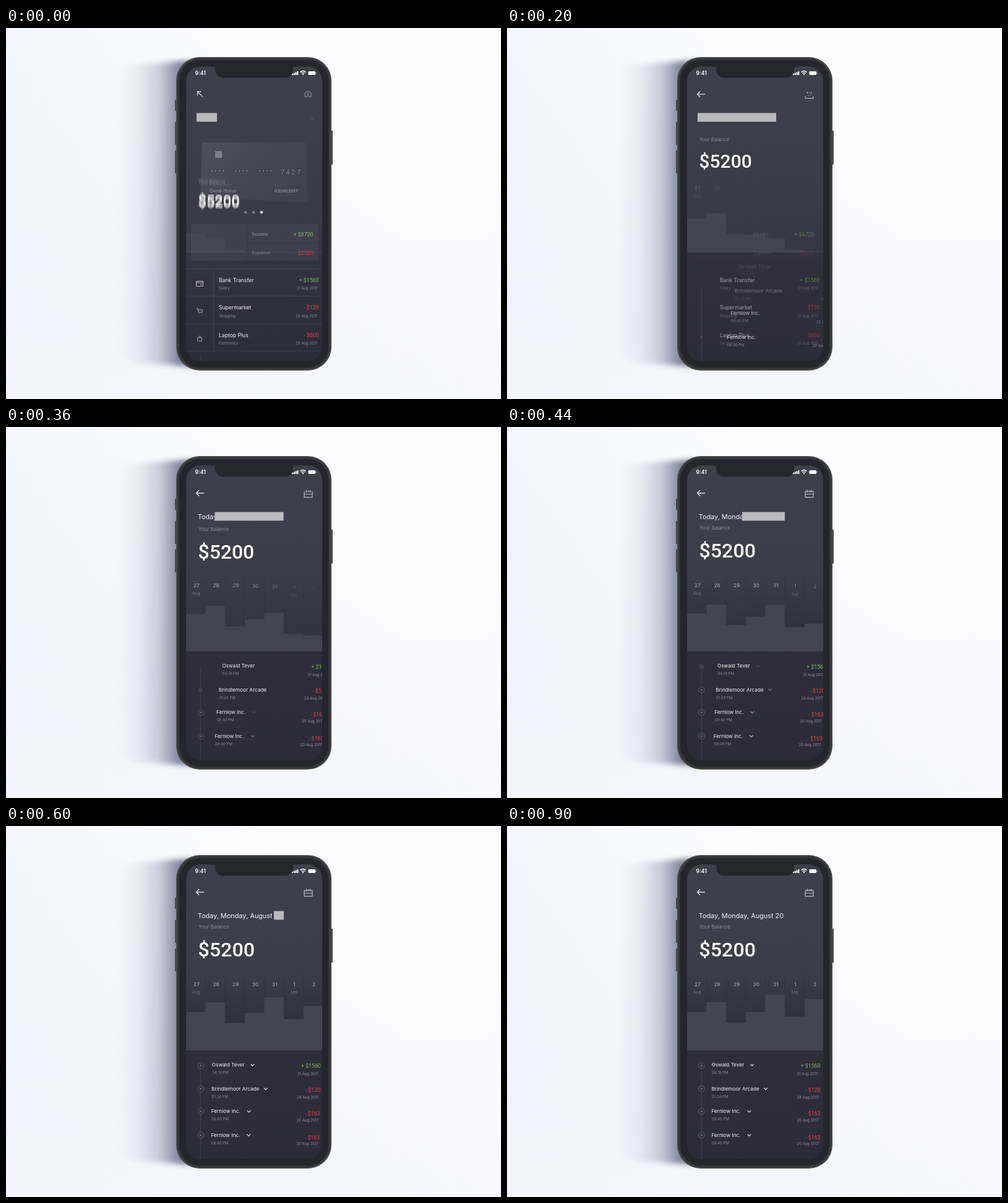
Write an HTML page with a canvas that moves like this. It is 800x600 px and loops after 1.04 s.

```html
<!DOCTYPE html>
<html lang="en">
<head>
<meta charset="utf-8">
<title>Balance screen</title>
<style>
html, body { margin: 0; width: 100%; height: 100%; overflow: hidden; background: #fff; }
canvas { display: block; }
</style>
</head>
<body>
<canvas id="stage" width="800" height="600"></canvas>
<script>
const LOOP = 1040, STEP = 20;
const stage = document.getElementById('stage');
const back = document.createElement('canvas');
back.width = 800;
back.height = 600;
let g = back.getContext('2d');

const SANS = 'Inter, sans-serif', DIN = 'Roboto, sans-serif';
const GREEN = '#84bd56', RED = '#e2474f', GREY = '#8a8a95', WHITE = '#f4f4f7';
const clamp = v => Math.max(0, Math.min(1, v));

// Smooth monotone curve through time, value pairs
function track(t, ...k) {
  const n = k.length / 2, T = i => k[2 * i], V = i => k[2 * i + 1];
  if (t <= T(0)) return V(0);
  if (t >= T(n - 1)) return V(n - 1);
  let i = 0;
  while (t > T(i + 1)) i++;
  const slope = j => (V(j + 1) - V(j)) / (T(j + 1) - T(j));
  const tangent = j => {
    if (j === 0) return slope(0);
    if (j === n - 1) return 0;
    const a = slope(j - 1), b = slope(j);
    return a * b > 0 ? 2 * a * b / (a + b) : 0;
  };
  const h = T(i + 1) - T(i), u = (t - T(i)) / h, w = 1 - u;
  return V(i) * (1 + 2 * u) * w * w + V(i + 1) * u * u * (3 - 2 * u)
    + h * u * w * (tangent(i) * w - tangent(i + 1) * u);
}

function gradient(x0, y0, x1, y1, ...colors) {
  const f = g.createLinearGradient(x0, y0, x1, y1);
  colors.forEach((c, i) => f.addColorStop(i / (colors.length - 1), c));
  return f;
}

function rect(x, y, w, h, fill, alpha = 1) {
  g.globalAlpha = alpha;
  g.fillStyle = fill;
  g.fillRect(x, y, w, h);
}

function round(x, y, w, h, r, fill) {
  g.globalAlpha = 1;
  g.beginPath();
  g.roundRect(x, y, w, h, r);
  g.fillStyle = fill;
  g.fill();
}

function disc(x, y, r, fill, alpha = 1) {
  g.globalAlpha = alpha;
  g.beginPath();
  g.arc(x, y, r, 0, 7);
  g.fillStyle = fill;
  g.fill();
}

function stroke(path, color, width = 1, alpha = 1) {
  g.globalAlpha = alpha;
  g.strokeStyle = color;
  g.lineWidth = width;
  g.stroke(new Path2D(path));
}

function text(s, x, y, size, color, alpha = 1, font = SANS, weight = 400, align = 'left') {
  if (alpha <= 0) return;
  g.globalAlpha = clamp(alpha);
  g.font = `${weight} ${size}px ${font}`;
  g.textAlign = align;
  g.fillStyle = color;
  g.fillText(s, x, y);
}

const amount = (s, x, y, alpha) =>
  text(s, x, y, 8.8, s[0] === '+' ? GREEN : RED, alpha, DIN, 400, 'right');

function at(x, y, scale, angle, draw) {
  g.save();
  g.translate(x, y);
  g.rotate(angle);
  g.scale(scale, scale);
  draw();
  g.restore();
}

// Vertically smeared text
function smear(s, x, y, size, color, alpha, spread, font, weight) {
  if (spread < 0.2) return text(s, x, y, size, color, alpha, font, weight);
  for (let j = -2; j <= 2; j++) text(s, x, y + j * spread / 2, size, color, alpha * 0.42, font, weight);
}

function drawBackdrop() {
  rect(0, 0, 800, 600, gradient(0, 420, 470, 90, '#eef1fb', '#f5f7fd', '#fdfdff'));
  rect(0, 0, 800, 600, gradient(0, 200, 0, 600, 'rgba(246,246,254,0)', 'rgba(246,246,254,.75)'));

  g.filter = 'blur(4px)';
  g.globalAlpha = 1;
  g.fillStyle = gradient(182, 0, 280, 0, 'rgba(110,118,155,0)', 'rgba(110,118,155,.1)',
    'rgba(100,107,142,.3)', 'rgba(75,80,108,.68)');
  g.fill(new Path2D('M180 62L300 52V548L205 541L180 530Z'));
  g.filter = 'none';

  for (const [y, h] of [[116, 18], [152, 37], [198, 37]]) round(273, y, 4, h, 1, '#4b4a48');
  round(524, 166, 4, 55, 1, '#4b4a48');
  round(275, 47, 251, 507, 38, '#4a4945');
  round(277, 49, 247, 503, 36, '#34353d');
  round(280, 52, 241, 497, 33, '#25262b');
}

function drawStatus() {
  round(338, 52, 126, 28.5, [0, 0, 13, 13], '#25262b');
  round(330, 52, 142, 10.5, 0, '#25262b');
  text('9:41', 305.5, 76, 8.6, '#fff', 1, SANS, 600);
  for (let i = 0; i < 4; i++) rect(462 + i * 2.8, 74 - i * 1.3, 2, 2 + i * 1.3, '#fff');
  stroke('M475.5 71.5Q480 67.5 484.5 71.5M477.3 73.6Q480 71.2 482.7 73.6', '#fff', 1.3);
  disc(480, 75.2, 1.1, '#fff');
  round(488.5, 70, 11.5, 6, 1.5, '#fff');
  rect(500.7, 72, 1, 2, '#fff', 0.7);
}

function drawCard(t) {
  const a = track(t, 0, 1, 50, 0.3, 100, 0);
  if (a <= 0) return;
  g.globalAlpha = a;
  g.fillStyle = gradient(320, 185, 480, 282, 'rgba(105,105,118,.4)', 'rgba(90,90,102,.3)', 'rgba(80,80,94,.25)');
  g.fill(new Path2D('M317 185H485L488 282L314 274Z'));
  rect(338, 199, 11, 11, '#8b8b95', a * 0.8);
  for (let i = 0; i < 12; i++) disc(333 + i * 6 + (i >> 2) * 14.5, 231, 1.1, '#85858f', a);
  [...'7427'].forEach((c, i) => text(c, 444 + i * 8.8, 236.5, 10, '#85858f', a, DIN));
  text('Card holder', 330, 256, 6.5, GREY, a * 0.3);
  text('Derek Holme', 329.5, 266, 7, '#a0a0aa', a * 0.75, SANS, 500);
  text('Expiry', 434, 256, 6.5, GREY, a * 0.3);
  text('03/20/2017', 434, 266, 6.8, '#a0a0aa', a, SANS, 500);
  [387, 400, 413].forEach((x, i) => disc(x, 298, 2.3, i < 2 ? '#757580' : '#e8e8ec', a));
}

function drawSummary(t) {
  const panel = track(t, 0, 1, 120, 0.45, 260, 0);
  rect(299, 317, 206, 59, '#5a5b6c', panel * 0.23);
  stroke('M389.5 318V376M389 347.5H505', '#2e2e3a', 1, panel * 0.5);
  const fade = track(t, 0, 1, 120, 0.75, 280, 0);
  text('Income', 398, 335.5, 7.2, '#b0b0ba', fade * 0.9);
  text('Expense', 398, 365.5, 7.2, '#b0b0ba', fade * 0.6);
  amount('+ $6720', 496.5, 336.5, track(t, 0, 1, 120, 0.8, 280, 0.18, 360, 0));
  amount('- $2520', 496.5, 366.5, fade * 0.85);
  stroke('M291 362.5H511', '#6a6b7a', 1, track(t, 0, 0.35, 200, 0.25, 300, 0));
}

const ICONS = [
  'M-5.5 -4H5.5V4H-5.5ZM-5.5 -1.5H5.5M1 1.5H3.5',
  'M-5.5 -5H-3.5L-2 2H4L5.5 -2.5H-3M-1.5 4.5H-.5M3 4.5H4',
  'M-4 -2H4L4.5 4.5H-4.5ZM-2 -2Q-2 -5.5 0 -5.5Q2 -5.5 2 -2'
];
const RECENT = [
  ['Bank Transfer', 'Salary', '+ $1560', '31 Aug 2017'],
  ['Supermarket', 'Shopping', '- $120', '28 Aug 2017'],
  ['Laptop Plus', 'Electronics', '- $600', '20 Aug 2017']
];

function drawRecent(t) {
  const lines = track(t, 0, 1, 120, 0.4, 240, 0);
  stroke('M291 389.5H511M291 433.5H511M291 478.5H511M291 522.5H511M335.5 389V522', '#4d4d5b', 1, lines * 0.55);
  RECENT.forEach(([name, kind, sum, date], i) => {
    const y = 410.5 + i * 44.5, a = track(t, 0, 1, 120, 0.9, 280, 0.2 - i * 0.04, 360, 0);
    const size = track(t, 0, 1 - i * 0.1, 120, 0.5 - i * 0.15, 170, 0);
    at(313, y + 3, size, 0, () => stroke(ICONS[i], '#d0d0d6', 1, size > 0 ? 0.9 : 0));
    text(name, 344, y, 8.6, WHITE, a);
    text(kind, 344, y + 12.5, 6, GREY, a);
    amount(sum, 505.5, y, a);
    text(date, 503.5, y + 12.5, 6, GREY, a, SANS, 400, 'right');
  });
}

const BARS = [62, 78, 45, 62, 90, 55, 84];
const DAYS = ['27', '28', '29', '30', '31', '1', '2'];

function drawChart(t) {
  const shade = track(t, 180, 0, 280, 0.25, 440, 0.75, 600, 1);
  const solid = track(t, 0, 0.7, 200, 1);
  BARS.forEach((full, i) => {
    const x = 291 + i * 31.65, w = Math.min(31.65, 511 - x);
    const u = t + 72 * (4 - i);
    const top = 363 - full * track(u, 70, 0, 120, 0.07, 200, 0.26, 280, 0.49, 340, 0.65, 440, 0.84, 600, 0.956, 760, 0.99, 900, 1);
    rect(x, 240, w, top - 240, gradient(0, 240, 0, 320, 'rgba(45,44,56,0)', 'rgba(45,44,56,.75)'), shade);
    if (i) rect(x - 0.5, 240, 1, top - 240, '#2f2f3b', shade * 0.4);
    rect(x, top, w, 363 - top, gradient(0, 280, 0, 363, '#454653', '#42434f'), solid);
    const p = clamp((t - 120 - 35 * i) / 210), y = 258.5 + 5 * (1 - p);
    const cx = 308 + i * 31.6;
    text(DAYS[i], cx, y, 8, '#b4b4be', p, SANS, 400, 'center');
    if (i === 0 || i === 5) text(i ? 'Sep' : 'Aug', cx - 0.7, y + 12.5, 6.6, '#7a7a86', p, SANS, 400, 'center');
  });
}

const HISTORY = [
  ['Oswald Tever', '04:19 PM', '+ $1560', '31 Aug 2017', 389, 387.5, 65.5],
  ['Brindlemoor Arcade', '01:24 PM', '- $120', '28 Aug 2017', 427.5, 425, 87.5],
  ['Fernlow Inc.', '08:40 PM', '- $163', '20 Aug 2017', 464, 461.5, 61],
  ['Fernlow Inc.', '08:40 PM', '- $163', '20 Aug 2017', 502.5, 500, 61]
];

function drawHistory(t) {
  const top = track(t, 0, 527, 120, 465, 280, 390);
  stroke(`M314.5 ${top}V539`, '#50505e', 1, 0.55);
  HISTORY.forEach(([name, time, sum, date, y, ringY, mark], i) => {
    const u = t + 40 * i;
    const dx = track(u, 0, 64, 120, 55, 280, 31, 440, 9.5, 600, 2.3, 760, 0.4, 900, 0);
    const a = track(u, 120, 0, 200, 0.17, 240, 0.35, 280, 0.75, 400, 1);
    const ring = clamp((t + 70 * i - 380) / 100);
    if (ring > 0) {
      disc(314.5, ringY, 5 * ring, '#33323f');
      g.strokeStyle = '#5b5b68';
      g.lineWidth = 0.9;
      g.stroke();
      disc(314.5, ringY, 1.3 * ring, '#6a6a76');
    }
    text(name, 330.5 + dx, y, 8.2, WHITE, a);
    text(time, 331 + dx, y + 12.3, 6, GREY, a);
    amount(sum, 506.5 + dx, y + 2 + i * 0.8, a);
    text(date, 468.5 + dx, y + 13.5, 6, '#92929d', a);
    const x = 330.5 + dx + mark;
    stroke(`M${x - 2.8} ${y - 4}l2.8 2.9l2.8 -2.9`, '#d8d8de', 1.2, clamp((u - 410) / 180));
  });
}

function drawIcons(t) {
  const turn = track(t, 0, Math.PI / 4, 120, 0.13, 220, 0);
  at(313.5, 107, track(t, 0, 0.95, 160, 1), turn,
    () => stroke('M6.5 0H-6M-1.3 -4.7L-6 0L-1.3 4.7', '#dcdce1', 1.3));

  const user = track(t, 0, 0.65, 90, 0);
  if (user > 0) {
    stroke('M484.5 112A5.4 5.4 0 1 1 491.5 112', '#a0a0aa', 1.5, user);
    disc(488, 106.5, 2.2, '#a0a0aa', user * 0.6);
    stroke('M484.5 112Q488 107.5 491.5 112', '#a0a0aa', 1.4, user);
    stroke('M492 145L498 151M498 146L492 150', '#7a7a86', 0.9, user * 0.6);
  }

  const half = track(t, 20, 0, 110, 6.5);
  if (half <= 0) return;
  const side = track(t, 120, 0, 280, 6, 400, 9.5);
  const close = clamp((t - 290) / 120), bar = clamp((t - 150) / 110);
  const pin = track(t, 80, 0, 120, 1, 280, 4, 360, 4.5);
  stroke(`M${488.5 - half} ${113.7 - side}V113.7H${488.5 + half}V${113.7 - side}`, '#b9b9c1', 1.2);
  stroke('M482 104.2H495', '#b9b9c1', 1.2, close);
  stroke(`M${488.5 - 6.5 * bar} 108.7H${488.5 + 6.5 * bar}`, '#b9b9c1', 1.1, bar);
  stroke(`M485.5 ${106 - pin}V106M488.5 ${105 - pin / 2}V105M491.5 ${106 - pin}V106`, '#b9b9c1', 1.1, clamp(pin));
}

function drawHeader(t) {
  const left = track(t, 0, 308, 200, 308, 280, 309, 440, 380, 600, 433, 720, 449);
  const right = track(t, 0, 341, 120, 410, 280, 447.5, 440, 449);
  if (left > 309.5) {
    g.save();
    g.beginPath();
    g.rect(300, 130, left - 300, 28);
    g.clip();
    text('Today, Monday, August 20', 309.7, 149, 10.9, WHITE);
    g.restore();
  }
  if (right > left) rect(left, 137.5, right - left, 14, '#babaBC');

  const blur = track(t, 0, 3, 120, 0.8, 240, 0);
  const labelY = track(t, 0, 251.5, 120, 201, 280, 172.5, 440, 166.2, 520, 166);
  smear('Your Balance', 311, labelY, track(t, 0, 7, 120, 7.6, 280, 7.9, 440, 8),
    '#8d8d98', track(t, 0, 0.75, 160, 1), blur, SANS);
  const y = track(t, 0, 288.5, 120, 242, 280, 217, 440, 211, 520, 210.7);
  const size = track(t, 0, 23.6, 120, 28, 280, 31.3, 440, 32.2);
  smear('$5200', 310.5, y, size, '#fff', 1, blur, DIN, 500);
}

function draw(t) {
  g.globalAlpha = 1;
  g.drawImage(back, 0, 0);
  g.save();
  g.beginPath();
  g.roundRect(291, 62, 220, 477, 24);
  g.clip();
  rect(291, 62, 220, 477, gradient(300, 62, 330, 539, '#3e3f4b', '#3e3e4b', '#3b3b48', '#32313e', '#2d2c39'));
  rect(291, 363, 220, 176, gradient(0, 363, 0, 539, 'rgba(38,37,48,.5)', 'rgba(38,37,48,.12)'),
    track(t, 0, 0.1, 120, 0.45, 280, 0.9, 440, 1));
  drawChart(t);
  drawSummary(t);
  drawRecent(t);
  drawCard(t);
  drawHistory(t);
  drawIcons(t);
  drawHeader(t);
  g.restore();
  drawStatus();
}

drawBackdrop();
g = stage.getContext('2d');
const start = performance.now();
function tick() {
  const t = (performance.now() - start) % LOOP;
  draw(Math.min(900, Math.floor(t / STEP) * STEP));
  requestAnimationFrame(tick);
}
tick();
</script>
</body>
</html>
```
